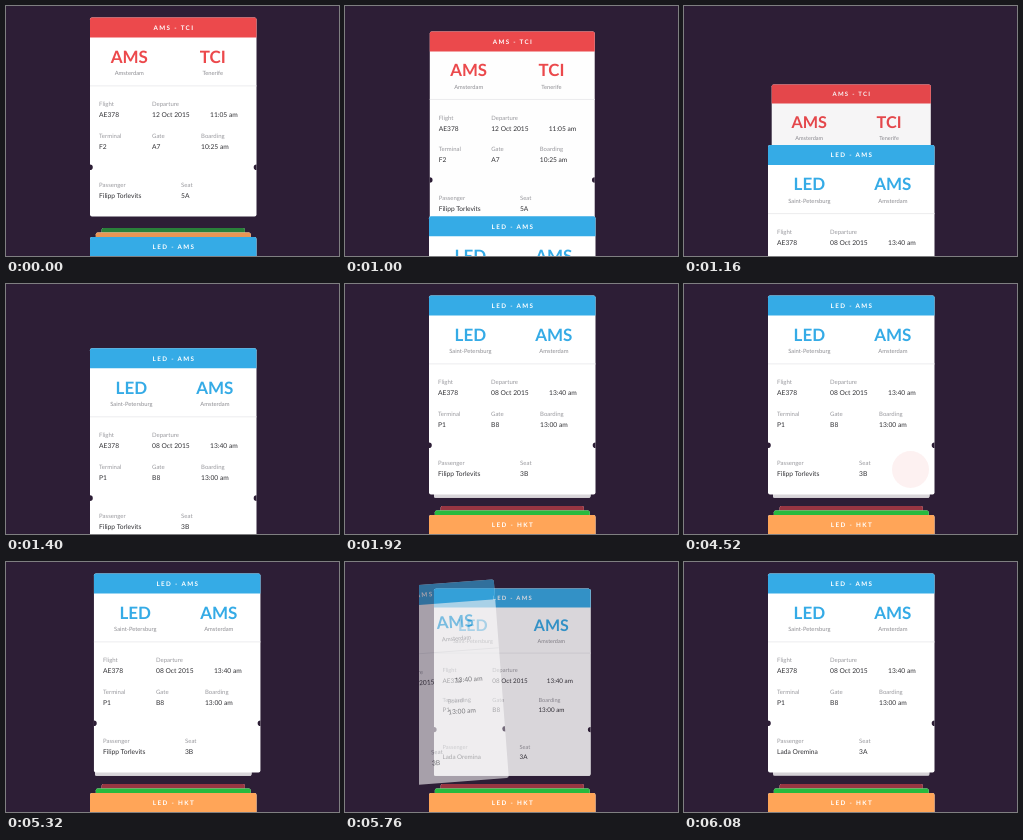
These frames come from a looping animation (333 px wide and 250 px high, 9.6 s). An HTML page:

```html
<!DOCTYPE html>
<html lang="en">
<head>
<meta charset="utf-8">
<title>Boarding passes</title>
<style>
  html, body { margin: 0; width: 100%; height: 100%; overflow: hidden; background: #2d1e36; }
  svg { display: block; width: 100vw; height: 100vh; font-family: Lato, sans-serif; text-rendering: geometricPrecision; }
  .title { font-size: 6.3px; font-weight: 700; letter-spacing: 1.35px; fill: #fff; text-anchor: middle; }
  .code { font-size: 17px; font-weight: 700; text-anchor: middle; }
  .city { font-size: 5.8px; fill: #8e8e93; text-anchor: middle; }
  .label { font-size: 6px; fill: #9a9a9f; }
  .value { font-size: 6.7px; fill: #323236; }
</style>
</head>
<body>
<svg id="stage" viewBox="0 0 333 250">
  <clipPath id="screen"><rect x="74" width="185" height="250"/></clipPath>
  <g id="cards" clip-path="url(#screen)"></g>
  <circle id="tap" cx="226.5" cy="185.5" r="18.5" fill="#e2404a"/>
</svg>
<script>
const LOOP = 9600, STEP = 40, BG = '#2d1e36';
const HALF = 83.25, WIDTH = 2 * HALF, HEIGHT = 199, CENTER = 167.25, TOP = 11.4, DOCK = 231;
const RED = '#ec494c', BLUE = '#35abe6', ORANGE = '#ffa558', GREEN = '#27cd3f';
const holder = document.getElementById('cards');
const tap = document.getElementById('tap');

// Card coordinates: x = 0 is the middle, y = 0 the top edge.
const text = (cls, x, y, str, fill) =>
  `<text class="${cls}" x="${x}" y="${y}"${fill ? ` fill="${fill}"` : ''}>${str}</text>`;
const field = (x, y, label, value) =>
  text('label', x, y, label) + text('value', x, y + 11, value);

function details(pass, color) {
  const [from, to] = pass.ends.map(([x, code, city]) =>
    text('code', x, 45.3, code, color) + text('city', x, 58, city));
  return from + to + `<path d="M${-HALF} 68.5h${WIDTH}" stroke="#ececee"/>` +
    field(-74.2, 89, 'Flight', 'AE378') +
    field(-21.2, 89, 'Departure', pass.date) +
    text('value', 36.8, 100, pass.time) +
    field(-74.2, 120.2, 'Terminal', pass.terminal) +
    field(-21.2, 120.2, 'Gate', pass.gate) +
    field(27.8, 120.2, 'Boarding', pass.boarding) +
    field(-74.2, 170, 'Passenger', pass.name) +
    field(7.8, 170, 'Seat', pass.seat);
}

function makeCard(color, title, pass) {
  const g = document.createElementNS('http://www.w3.org/2000/svg', 'g');
  const box = `x="${-HALF}" width="${WIDTH}" height="${HEIGHT}" rx="2"`;
  g.innerHTML = `<rect ${box} fill="#fff"/>
    <path d="M${-HALF} 20v-18q0-2 2-2h${WIDTH - 4}q2 0 2 2v18z" fill="${color}"/>
    ${text('title', 0.7, 12.2, title)}
    ${pass ? details(pass, color) : ''}
    <path d="M${-HALF} 147a2.8 2.8 0 0 1 0 5.6zM${HALF} 147a2.8 2.8 0 0 0 0 5.6z" fill="${BG}"/>
    <rect ${box} fill="${BG}" class="dim"/>`;
  holder.append(g);
  return g;
}

function place(card, { x = CENTER, y, scale = 1, turn = 0, dim = 0, alpha = 1 }) {
  card.setAttribute('transform',
    `translate(${x} ${y}) scale(${scale}) rotate(${turn} 0 ${HEIGHT / 2})`);
  card.setAttribute('opacity', alpha);
  card.querySelector('.dim').setAttribute('opacity', dim);
}

const tenerife = {
  ends: [[-44, 'AMS', 'Amsterdam'], [39.6, 'TCI', 'Tenerife']],
  date: '12 Oct 2015', time: '11:05 am', terminal: 'F2', gate: 'A7',
  boarding: '10:25 am', name: 'Filipp Torlevits', seat: '5A'
};
const amsterdam = {
  ends: [[-41.9, 'LED', 'Saint-Petersburg'], [41.6, 'AMS', 'Amsterdam']],
  date: '08 Oct 2015', time: '13:40 am', terminal: 'P1', gate: 'B8',
  boarding: '13:00 am', name: 'Filipp Torlevits', seat: '3B'
};

// Back to front
const red = makeCard(RED, 'AMS - TCI', tenerife);
const green = makeCard(GREEN, '');
const orange = makeCard(ORANGE, 'LED - HKT');
const spare = makeCard(BLUE, 'LED - AMS');
const next = makeCard(BLUE, 'LED - AMS', { ...amsterdam, name: 'Lada Oremina', seat: '3A' });
const front = makeCard(BLUE, 'LED - AMS', amsterdam);

const progress = (t, start, end) => Math.min(1, Math.max(0, (t - start) / (end - start)));
const mix = (a, b, p) => a + (b - a) * p;
const easeOut = (p, power) => 1 - (1 - p) ** power;
const easeInOut = p => p < 0.5 ? 2 * p * p : 1 - 2 * (1 - p) ** 2;
const docked = depth =>
  ({ y: DOCK - 4.5 * depth, scale: 1 - 0.07 * depth, dim: 0.11 * depth * depth });

function draw(t) {
  // Swap the open pass with the docked one
  const swap = progress(t, 960, 1920);
  const rise = easeOut(swap, 2.32), sink = easeOut(swap, 1.64);
  place(red, { y: mix(TOP, 222, sink), scale: 1 - 0.14 * sink, dim: 0.44 * sink * sink });
  place(green, docked(2 - rise));
  place(orange, docked(1 - rise));

  // Throw the front pass away to the left
  const y = mix(DOCK, TOP, rise);
  const pull = easeOut(progress(t, 5280, 5440), 2);
  const fly = easeInOut(progress(t, 5440, 6080));
  const grow = easeOut(progress(t, 5760, 6080), 2);
  place(spare, { y: y + 15.3, scale: 0.94, dim: 0.2 });
  place(next, { y: y + 15.3 * (1 - grow), scale: mix(0.94, 1, grow), dim: 0.18 * (1 - grow) });
  place(front, {
    x: CENTER + 9 * pull - 206 * fly,
    y: y + 24 * fly,
    turn: -8.7 * fly,
    alpha: t < 6080 ? 1 - 0.84 * fly : 0
  });

  tap.setAttribute('opacity', t < 3840 ? 0 : 0.26 * (1 - progress(t, 3840, 4800)));
}

const begin = performance.now();
function tick() {
  const t = (performance.now() - begin) % LOOP;
  draw(Math.floor(t / STEP) * STEP);
  requestAnimationFrame(tick);
}
tick();
</script>
</body>
</html>
```
